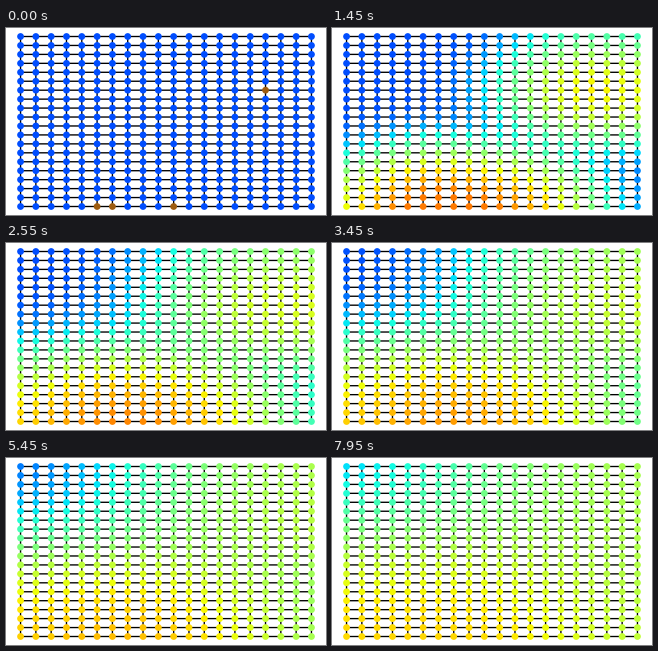
Write a matplotlib script that moves like this. It is 320 px wide and 187 px high and loops after 8000 ms.

```python
import numpy as np
import matplotlib.pyplot as plt
from matplotlib.animation import FuncAnimation
from matplotlib.collections import LineCollection

W, H, DPI = 320, 187, 80
N = 20
FRAMES, STEP_MS = 160, 50
RATE = 0.122            # diffusion time per frame
FLOOR = 10 ** -3.72     # background heat relative to a fresh source
SLOPE = 0.215           # colour change per decade of heat
SOURCES = [(19, 5, 1.3), (19, 6, 1.3), (19, 10, 1.3), (6, 16, 1)]  # row, column, heat
BROWN = (0.62, 0.36, 0.06, 1)

# the grid fills the stage with a 5 % margin of its own size
xs = np.linspace(W * 0.05 / 1.1, W * 1.05 / 1.1, N)
ys = np.linspace(H * 0.05 / 1.1, H * 1.05 / 1.1, N)
gx, gy = np.meshgrid(xs, ys)

# Laplacian of a path of N nodes; the grid is the product of two paths
lap = 2 * np.eye(N) - np.eye(N, k=1) - np.eye(N, k=-1)
lap[0, 0] = lap[-1, -1] = 1
eigval, eigvec = np.linalg.eigh(lap)

start = np.zeros((N, N))
for row, col, amount in SOURCES:
    start[row, col] = amount


def heat(t):
    spread = (eigvec * np.exp(-eigval * t)) @ eigvec.T
    return np.clip(spread @ start @ spread, 0, None)


def node_colors(frame):
    level = 1 + SLOPE * np.log10(heat(frame * RATE) + FLOOR)
    level = level.ravel()
    rgba = plt.cm.jet(np.clip(level, 0.2, 0.78))
    rgba[level > 0.95] = BROWN
    return rgba


def px(size):
    return size * 72 / DPI


fig = plt.figure(figsize=(W / DPI, H / DPI), dpi=DPI, facecolor="white")
ax = fig.add_axes([0, 0, 1, 1])
ax.set_xlim(0, W)
ax.set_ylim(H, 0)
ax.axis("off")

edges = [[(xs[0], y), (xs[-1], y)] for y in ys]
edges += [[(x, ys[0]), (x, ys[-1])] for x in xs]
lines = LineCollection(edges, colors="black", linewidths=px(1.35), zorder=1)
lines.set_snap(False)
ax.add_collection(lines)
nodes = ax.scatter(gx.ravel(), gy.ravel(), s=px(6.8) ** 2, c=node_colors(0),
                   linewidths=0, zorder=2)


def update(frame):
    nodes.set_facecolor(node_colors(frame))
    return (nodes,)


anim = FuncAnimation(fig, update, frames=FRAMES, interval=STEP_MS,
                     repeat=True, repeat_delay=0, blit=False)
plt.show()
```
